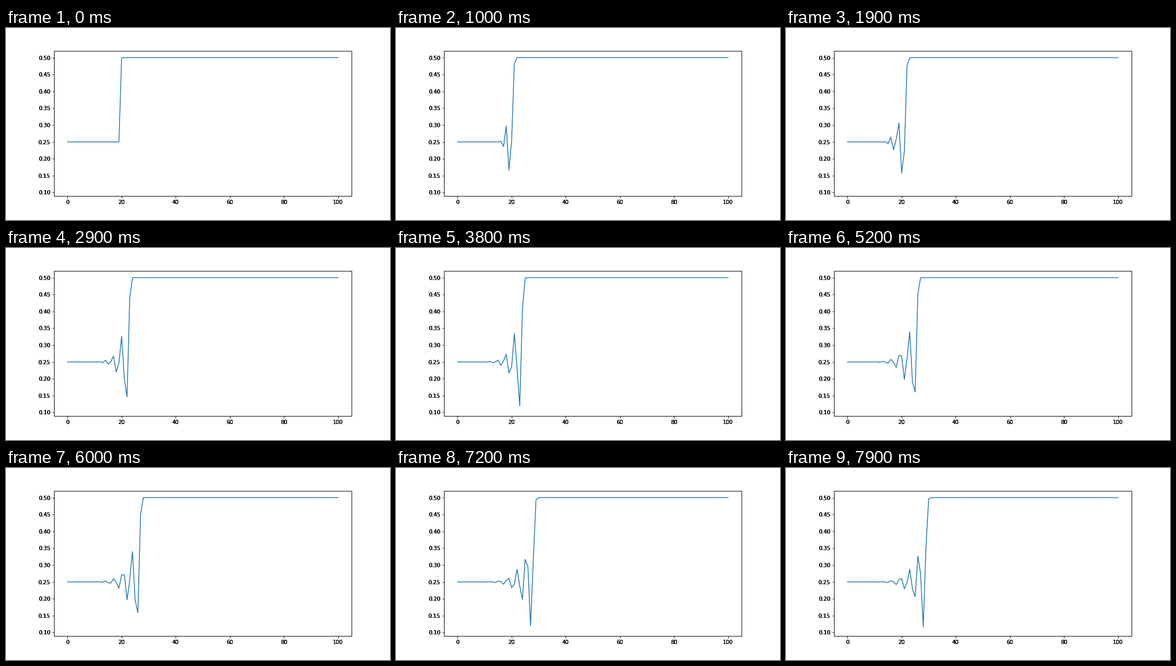
Animation, 720 px wide and 360 px high, one loop 8000 ms. Source, as a matplotlib script:

```python
import numpy as np
import matplotlib.pyplot as plt
from matplotlib.animation import FuncAnimation

FRAMES = 80
RATIO = 0.5  # dt / dx
LABEL_PASSES = 4  # overprinting gives the labels their heavy edges


def flux(u):
    return u * (1 - u)


def step(u):
    """Two-step Lax-Wendroff update with fixed ends."""
    mid = (u[1:] + u[:-1]) / 2 - RATIO / 2 * np.diff(flux(u))
    new = u.copy()
    new[1:-1] -= RATIO * np.diff(flux(mid))
    return new


x = np.arange(101)
states = [np.where(x < 20, 0.25, 0.5)]
while len(states) < FRAMES:
    states.append(step(states[-1]))

low, high = np.min(states), 0.5
margin = 0.05 * (high - low)

plt.rcParams.update({"font.family": "DejaVu Sans", "font.size": 10})
fig, ax = plt.subplots(figsize=(10, 5), dpi=72, facecolor="white")
fig.subplots_adjust(left=0.125, right=0.9, bottom=0.125, top=0.88)
ax.set_xlim(-5, 105)
ax.set_ylim(low - margin, high + margin)
ax.set_xticks(range(0, 101, 20))
ax.set_yticks(np.arange(0.10, 0.51, 0.05))
ax.tick_params(width=1, length=3.5, labelbottom=False, labelleft=False)
for spine in ax.spines.values():
    spine.set_linewidth(1)


def label(text, pos, coords, offset, ha, va):
    for _ in range(LABEL_PASSES):
        ax.annotate(text, pos, xycoords=coords, xytext=offset,
                    textcoords="offset points", ha=ha, va=va,
                    annotation_clip=False)


for v in ax.get_xticks():
    label(f"{v:.0f}", (v, 0), ("data", "axes fraction"), (0, -7),
          "center", "top")
for v in ax.get_yticks():
    label(f"{v:.2f}", (0, v), ("axes fraction", "data"), (-7, 0),
          "right", "center_baseline")

line, = ax.plot(x, states[0], color="#1f77b4", lw=1.5)


def draw(i):
    line.set_ydata(states[i])
    return line,


anim = FuncAnimation(fig, draw, frames=FRAMES, interval=100,
                     repeat=True, repeat_delay=0)
plt.show()
```
